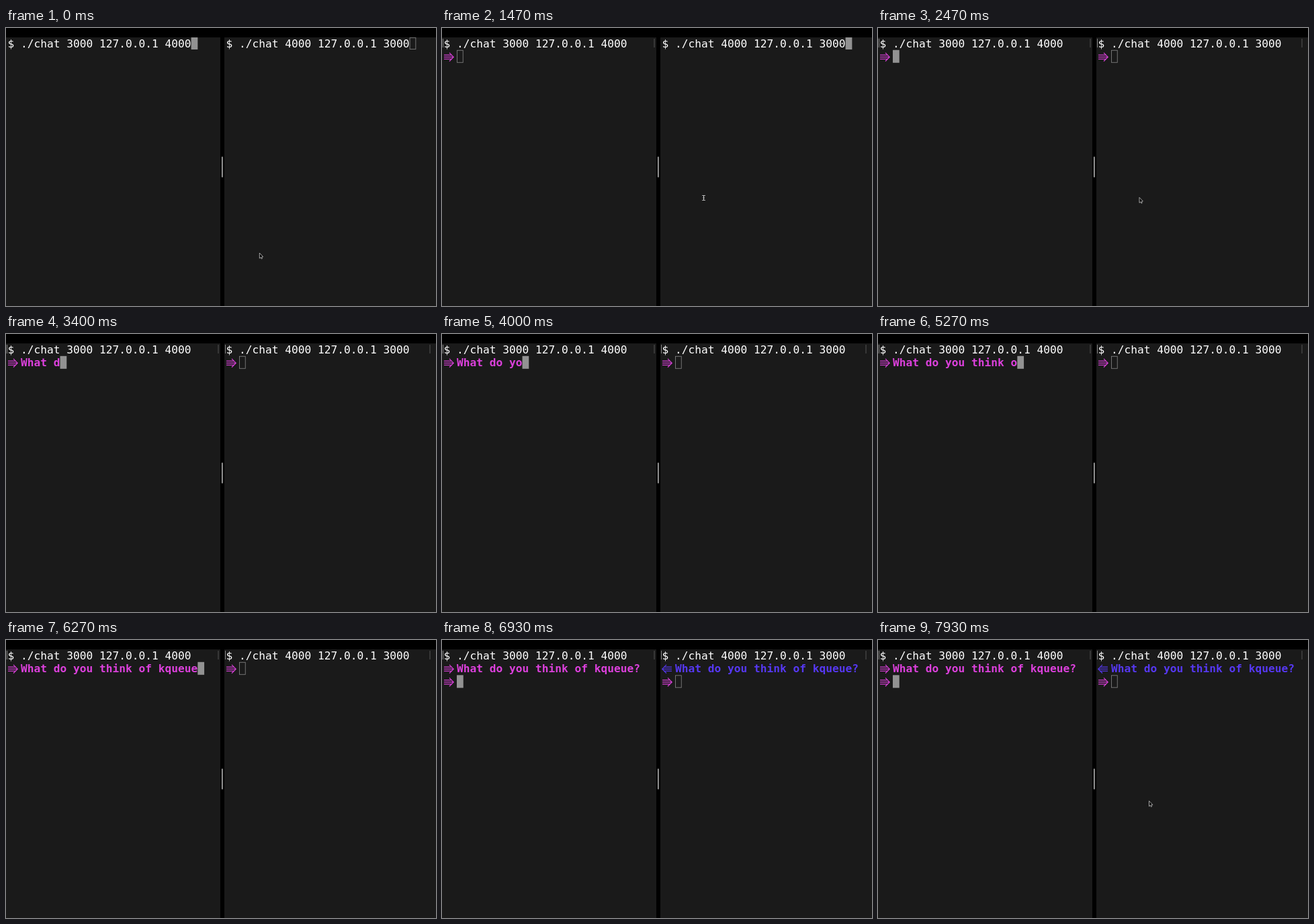
Write an HTML page with a canvas that moves like this. It is 640 by 414 pixels and loops after 8 s.

```html
<!DOCTYPE html>
<html lang="en">
<head>
<meta charset="utf-8">
<title>Chat in two terminals</title>
<style>
html, body { margin: 0; width: 100%; height: 100%; overflow: hidden; background: #000; }
canvas { display: block; }
</style>
</head>
<body>
<canvas id="stage" width="640" height="414"></canvas>
<script>
const ctx = document.getElementById('stage').getContext('2d');
const LOOP = 8000, COL = 9.753, ROW = 19.5;
const LEFT = 2.5, RIGHT = 327.5;
const PINK = '#dc40dc', BLUE = '#5638f2';
const MESSAGE = 'What do you think of kqueue?';
const LEFT_RUN = 730, FOCUS_RIGHT = 1130, RIGHT_RUN = 1800, FOCUS_LEFT = 2400, SEND = 6870;

// One time per typed character of MESSAGE
const KEYS = [2800, 2930, 3070, 3200, 3270, 3400, 3530, 3670, 3930, 4000, 4070, 4270, 4400, 4470,
  4670, 4730, 4930, 5130, 5270, 5400, 5470, 5600, 5730, 5800, 5870, 6000, 6070, 6470];

function rect(x, y, w, h, color) {
  ctx.fillStyle = color;
  ctx.fillRect(x, y, w, h);
}

function path(points, closed) {
  ctx.beginPath();
  points.forEach(([x, y]) => ctx.lineTo(x, y));
  if (closed) ctx.closePath();
}

function text(str, x, row, color, weight = 400) {
  ctx.font = `${weight} 16.2px "DejaVu Sans Mono", monospace`;
  ctx.fillStyle = color;
  ctx.fillText(str, x, 28.6 + row * ROW);
}

function arrow(x, row, color, dir = 1) {
  ctx.save();
  ctx.translate(x + 7.5, 23.7 + row * ROW);
  ctx.scale(dir, 1);
  ctx.strokeStyle = color;
  ctx.lineWidth = 1.2;
  for (const [y, end] of [[-3, 4], [0, 7], [3, 4]]) {
    path([[-7, y], [end, y]]);
    ctx.stroke();
  }
  path([[1, -6.3], [7.2, 0], [1, 6.3]]);
  ctx.stroke();
  ctx.restore();
}

function caret(x, col, row, focused) {
  const left = x + col * COL, top = row ? 13.3 + row * ROW : 14;
  const height = row ? 19 : 18;
  if (focused) return rect(left, top, COL, height, '#929292');
  ctx.strokeStyle = '#7c7c7c';
  ctx.lineWidth = 0.9;
  ctx.strokeRect(left + 0.5, top + 0.5, COL - 1, height - 1);
}

function marks(x, end) {
  rect(x, 16, 1, 13, '#858585');
  rect(end, 16, 1, 13, '#555');
}

function pointer(x, y) {
  path([[0, 0], [0, 8], [1.8, 6.5], [3, 8.8], [4.1, 8.2], [3.2, 6], [5.3, 5.7]]
    .map(([dx, dy]) => [x + dx, y + dy]), true);
  ctx.fillStyle = '#000';
  ctx.fill();
  ctx.strokeStyle = '#ccc';
  ctx.lineWidth = 0.8;
  ctx.stroke();
}

function textPointer(x, y) {
  rect(x - 2.5, y - 4, 5, 1, '#aaa');
  rect(x - 2.5, y + 3, 5, 1, '#aaa');
  rect(x - 0.5, y - 4, 1, 8, '#ccc');
  rect(x - 1.5, y - 0.5, 3, 1, '#aaa');
}

function mouse(t) {
  if (t < 70) pointer(377.3, 335);
  else if (t < 130) pointer(386, 270);
  else if (t < LEFT_RUN) pointer(389, 252.3);
  else if (t >= 1070 && t < RIGHT_RUN) textPointer(389.5, 253);
  else if (t >= 2330 && t < KEYS[0]) pointer(389, 252.3);
  else if (t >= 7400) {
    const p = Math.min((t - 7400) / 400, 1), ease = p * (2 - p);
    pointer(389 + 14.5 * ease, 252.3 - 12.6 * ease);
  }
}

function draw(t) {
  const leftFocus = t < FOCUS_RIGHT || t >= FOCUS_LEFT;
  const sent = t >= SEND;
  const typed = KEYS.filter(k => k <= t).length;

  rect(0, 0, 640, 414, '#000');
  rect(0, 14, 319, 400, '#1a1a1a');
  rect(325, 14, 315, 400, '#1a1a1a');
  ctx.beginPath();
  ctx.roundRect(320.8, 191.5, 2.2, 31, 1);
  ctx.fillStyle = '#8a8a8a';
  ctx.fill();

  text('$ ./chat 3000 127.0.0.1 4000', LEFT, 0, '#fff');
  if (t < LEFT_RUN) caret(LEFT, 28, 0, true);
  else {
    marks(1, 315.5);
    arrow(LEFT, 1, PINK);
    text(MESSAGE.slice(0, typed), LEFT + 2 * COL, 1, PINK, 700);
    if (sent) arrow(LEFT, 2, PINK);
    caret(LEFT, sent ? 2 : 2 + typed, sent ? 2 : 1, leftFocus);
  }

  text('$ ./chat 4000 127.0.0.1 3000', RIGHT, 0, '#fff');
  if (t < RIGHT_RUN) caret(RIGHT, 28, 0, !leftFocus);
  else {
    marks(326, 630.5);
    arrow(RIGHT, 1, sent ? BLUE : PINK, sent ? -1 : 1);
    if (sent) {
      text(MESSAGE, RIGHT + 2 * COL, 1, BLUE, 700);
      arrow(RIGHT, 2, PINK);
    }
    caret(RIGHT, 2, sent ? 2 : 1, !leftFocus);
  }

  mouse(t);
}

const start = performance.now();
function tick() {
  draw((performance.now() - start) % LOOP);
  requestAnimationFrame(tick);
}
tick();
</script>
</body>
</html>
```
